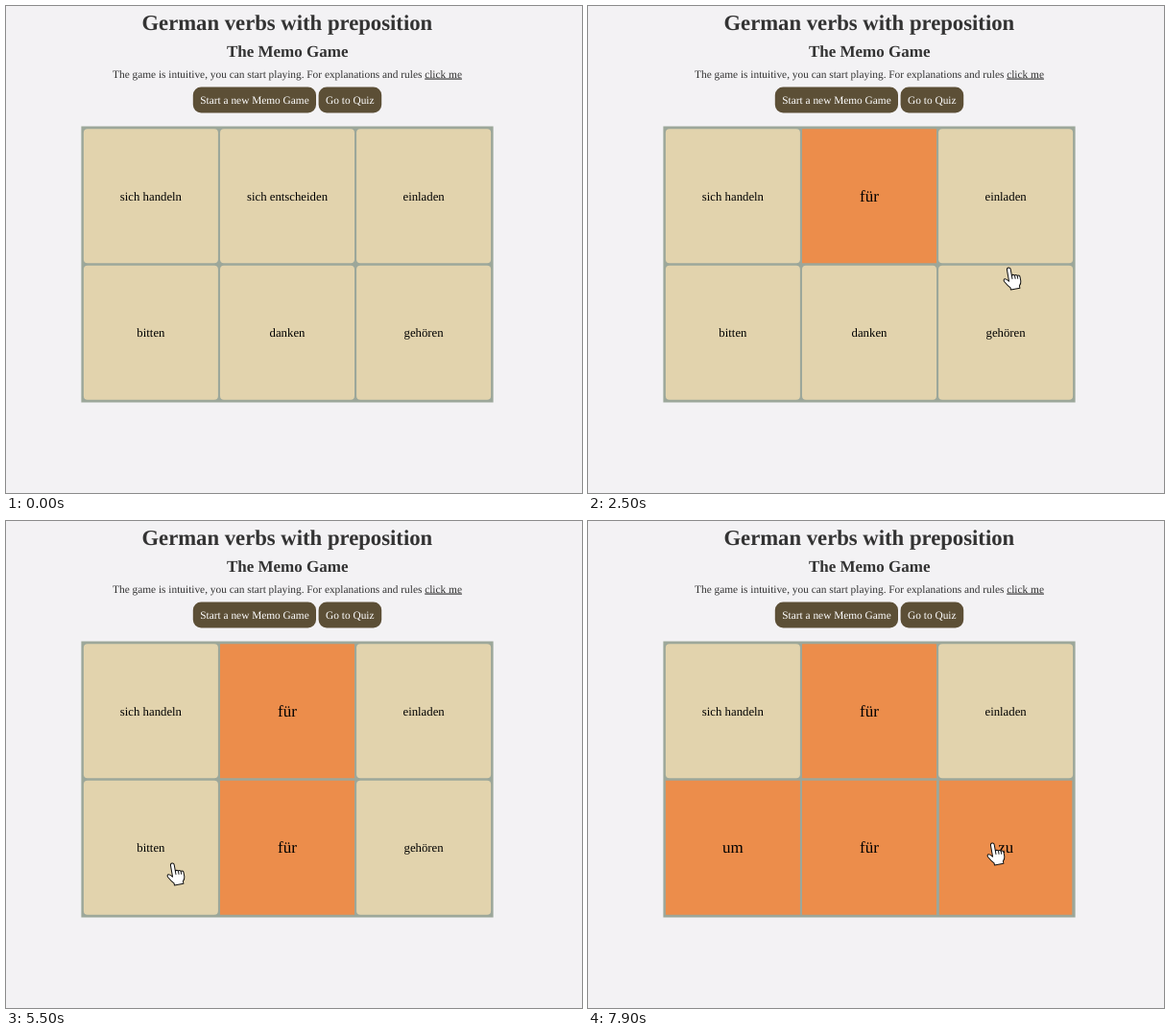
Write an HTML page that moves like this. It is 600x508 px and loops after 8000 ms.

```html
<!DOCTYPE html>
<html lang="en">
<head>
<meta charset="utf-8">
<title>Memo Game</title>
<style>
  html, body { margin: 0; width: 100%; height: 100%; overflow: hidden; background: #f3f2f4; }
  svg { display: block; }
  text {
    font: 11.35px "Liberation Serif", "Times New Roman", serif;
    text-anchor: middle;
    text-rendering: geometricPrecision;
  }
  .head { fill: #333; }
  .button rect { fill: #5c4f36; }
  .button text { fill: #fff; }
  .front rect { fill: #e2d3ad; }
  .front text { font-size: 12.77px; }
  .back rect { fill: #ec8d4b; }
  .back text { font-size: 17.02px; }
  #cursor path { fill: #fff; stroke: #111; stroke-linejoin: round; stroke-linecap: round; }
</style>
</head>
<body>
<svg width="600" height="508" viewBox="0 0 600 508">
  <text class="head" x="292.8" y="25" style="font-size:22.7px;font-weight:bold">German verbs with preposition</text>
  <text class="head" x="293.2" y="53" style="font-size:17.02px;font-weight:bold">The Memo Game</text>
  <text class="head" x="293" y="74.5">The game is intuitive, you can start playing. For explanations and rules <tspan text-decoration="underline">click me</tspan></text>
  <g class="button">
    <rect x="194.8" y="84.4" width="128.2" height="27" rx="8.5"/>
    <text x="259" y="101.6">Start a new Memo Game</text>
    <rect x="325.6" y="84.4" width="65.6" height="27" rx="8.5"/>
    <text x="358.3" y="101.6">Go to Quiz</text>
  </g>
  <rect x="78.4" y="125.5" width="429.2" height="288" fill="#9ca79a"/>
  <g id="cards"></g>
  <g id="cursor">
    <path id="hand" d="M-1.9 2Q-1.9 0 0 0Q1.9 0 1.9 2V8.6Q3.2 7.4 5 8.9Q6.5 8.2 7.6 9.8Q10.2 9.3 10.2 12V16Q10 18.5 8 20.5V23H-1.6V21Q-4 18.5-6.6 13.8Q-7.8 11.4-6 10.9Q-4.5 10.6-1.9 14Z M1.9 8.6V12M5 8.9V12.4M7.6 9.8V12.8" transform="rotate(-10)"/>
    <path id="arrow" d="M0 0V16L3.7 12.6L6.2 18.6L8.6 17.5L6.1 11.7H11.3Z"/>
  </g>
</svg>
<script>
const LOOP = 8000, STEP = 100, FLIP = 600;
const $ = id => document.getElementById(id);

// verb, preposition, time of the flip
const cards = [
  ["sich handeln"], ["sich entscheiden", "für", 880], ["einladen"],
  ["bitten", "um", 5480], ["danken", "für", 3780], ["gehören", "zu", 7380]
];

// time, x, y of the pointer tip
const path = [
  [100, 54, 300], [800, 291, 216], [1900, 291, 216], [2500, 438, 273],
  [2700, 526, 388], [2900, 547, 405], [3500, 367, 379], [3750, 310, 360],
  [4300, 310, 360], [4600, 377, 357], [4800, 377, 357], [5400, 173, 357],
  [6500, 173, 357], [7200, 421, 336], [LOOP, 421, 336]
];

const side = (name, label, radius, baseline) => `<g class="${name}">
  <rect x="-70" y="-70" width="140" height="140" rx="${radius}"/>
  <text y="${baseline}">${label}</text></g>`;

$("cards").innerHTML = cards.map(([verb, prep], i) =>
  `<g transform="translate(${150.9 + i % 3 * 142.1} ${198.2 + (i > 2) * 142.6})">
    ${side("front", verb, 4, 4.3)}${prep ? side("back", prep, 0.5, 5.6) : ""}</g>`).join("");
const groups = [...$("cards").children];

const clamp = p => Math.min(1, Math.max(0, p));
const ease = p => p * p * (3 - 2 * p);
const show = (node, on) => node.setAttribute("visibility", on ? "visible" : "hidden");

function drawCard(group, start, t) {
  const [front, back] = group.children;
  if (!back) return;
  const turn = Math.cos(Math.PI * ease(clamp((t - start) / FLIP)));
  show(front, turn > 0);
  show(back, turn <= 0);
  for (const face of [front, back])
    face.setAttribute("transform", `scale(${Math.max(Math.abs(turn), 0.001)} 1)`);
}

function drawCursor(t) {
  const visible = t >= path[0][0];
  const next = Math.max(1, path.findIndex(point => point[0] > t));
  const [t0, x0, y0] = path[next - 1], [t1, x1, y1] = path[next];
  const p = ease(clamp((t - t0) / (t1 - t0)));
  const x = x0 + (x1 - x0) * p, y = y0 + (y1 - y0) * p;
  const onBoard = x > 80 && x < 506;
  $("cursor").setAttribute("transform", `translate(${x} ${y})`);
  show($("hand"), visible && onBoard);
  show($("arrow"), visible && !onBoard);
}

function draw(now) {
  const t = Math.floor(now % LOOP / STEP) * STEP;
  groups.forEach((group, i) => drawCard(group, cards[i][2], t));
  drawCursor(t);
}

const begin = performance.now();
function tick() {
  draw(performance.now() - begin);
  requestAnimationFrame(tick);
}
tick();
</script>
</body>
</html>
```
